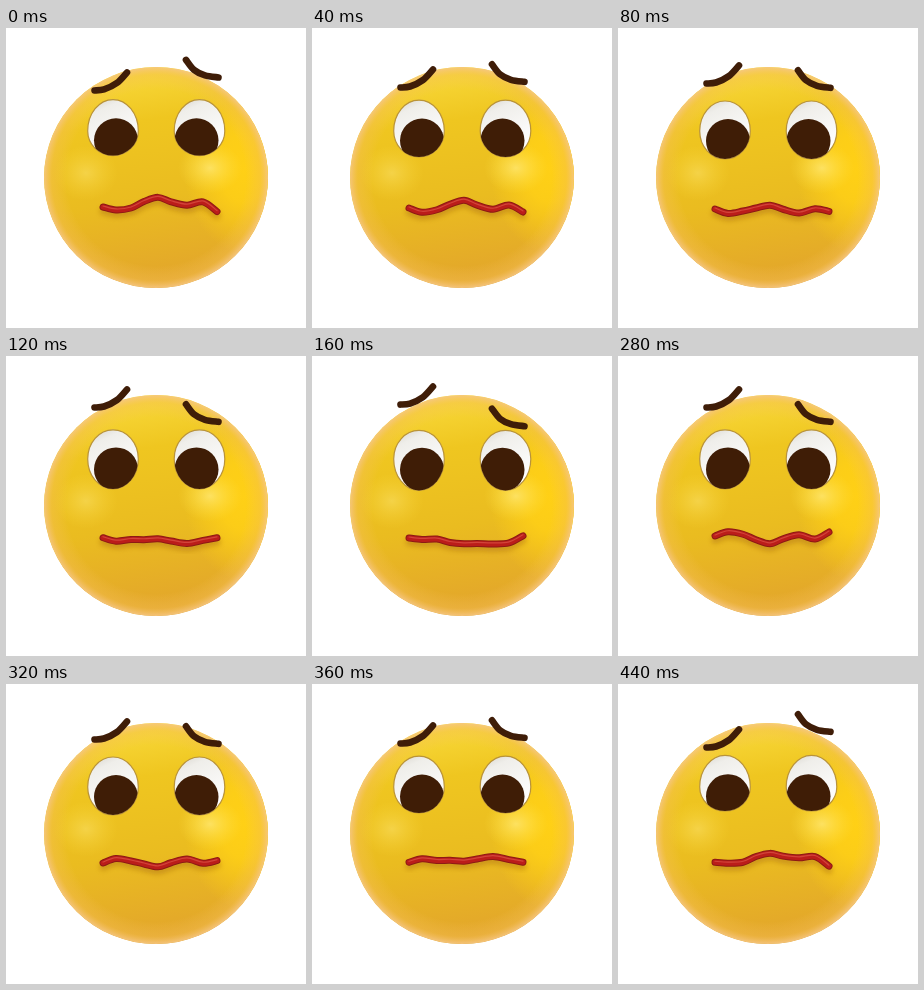
These frames come from a looping animation (300x300 px, 0.48 s). An HTML page:

```html
<!DOCTYPE html>
<html lang="en">
<head>
<meta charset="utf-8">
<title>Worried face</title>
<style>
  html, body { margin: 0; width: 100%; height: 100%; overflow: hidden; background: #fff; }
  svg { display: block; width: 100vw; height: 100vh; }
  path { fill: none; stroke-linecap: round; stroke-linejoin: round; }
</style>
</head>
<body>
<svg viewBox="0 0 300 300">
  <defs>
    <linearGradient id="skin" x1=".35" x2=".5" y2="1">
      <stop offset="0" stop-color="#f9da3c"/>
      <stop offset=".25" stop-color="#efc620"/>
      <stop offset=".6" stop-color="#eabc20"/>
      <stop offset="1" stop-color="#e2a42c"/>
    </linearGradient>
    <radialGradient id="rim">
      <stop offset=".8" stop-color="#f6c35c" stop-opacity="0"/>
      <stop offset=".93" stop-color="#f5bf55" stop-opacity=".4"/>
      <stop offset="1" stop-color="#f6c684" stop-opacity=".9"/>
    </radialGradient>
    <radialGradient id="sun">
      <stop offset="0" stop-color="#ffd016"/>
      <stop offset=".4" stop-color="#ffd016" stop-opacity=".85"/>
      <stop offset="1" stop-color="#ffd016" stop-opacity="0"/>
    </radialGradient>
    <radialGradient id="glow">
      <stop offset="0" stop-color="#ffe978" stop-opacity=".75"/>
      <stop offset="1" stop-color="#ffe040" stop-opacity="0"/>
    </radialGradient>
    <linearGradient id="white" x2=".4" y2="1">
      <stop offset="0" stop-color="#d5d2ca"/>
      <stop offset=".25" stop-color="#efeeea"/>
      <stop offset="1" stop-color="#fff"/>
    </linearGradient>
    <filter id="soft" x="-20%" y="-100%" width="140%" height="300%">
      <feGaussianBlur stdDeviation="2.5"/>
    </filter>
    <clipPath id="ball"><ellipse cx="150" cy="149.5" rx="112" ry="110.5"/></clipPath>
    <clipPath id="clipL"><path class="lidL"/></clipPath>
    <clipPath id="clipR"><path class="lidR"/></clipPath>
  </defs>

  <g clip-path="url(#ball)">
    <rect x="38" y="39" width="224" height="221" fill="url(#skin)"/>
    <ellipse cx="238" cy="140" rx="60" ry="85" fill="url(#sun)"/>
    <ellipse cx="204" cy="140" rx="32" ry="26" fill="url(#glow)"/>
    <ellipse cx="80" cy="145" rx="32" ry="28" fill="url(#glow)" opacity=".6"/>
    <ellipse cx="150" cy="149.5" rx="112" ry="110.5" fill="url(#rim)"/>
  </g>

  <g stroke="#b9933a" stroke-width="1.2">
    <path class="lidL" style="fill:url(#white)"/>
    <path class="lidR" style="fill:url(#white)"/>
  </g>
  <g fill="#3f1d06">
    <g clip-path="url(#clipL)"><ellipse class="pupil" cx="110" rx="22" ry="22"/></g>
    <g clip-path="url(#clipR)"><ellipse class="pupil" cx="190.5" rx="22" ry="22"/></g>
  </g>

  <g stroke="#3f1d08" stroke-width="6.6">
    <path id="browL"/>
    <path id="browR"/>
  </g>

  <path class="lip" stroke="#a86a10" stroke-width="7" opacity=".45" transform="translate(0 4)" filter="url(#soft)"/>
  <path class="lip" stroke="#8c1a14" stroke-width="7"/>
  <path class="lip" stroke="#bb1d1a" stroke-width="5"/>
  <path class="lip" stroke="#d2443a" stroke-width="1.2" transform="translate(0 -1)"/>
</svg>
<script>
const STEP = 40, STEPS = 12;

// Lip points: x, swing, and the step at which each one hangs lowest
const LIP = [
  [97, 2, 4], [110, 5.5, 2.3], [125, 3.5, 3], [138, 7.5, 5], [152, 11, 5.5],
  [165, 8, 4.7], [181, 8, 3.7], [197, 7.5, 4.8], [211, 4, 0.9]
];

const wave = (step, lag) => Math.cos((step - lag) / STEPS * 2 * Math.PI);
const set = (sel, name, value) =>
  document.querySelectorAll(sel).forEach(el => el.setAttribute(name, value));

// Smooth curve through the points
function curve(pts) {
  const at = i => pts[Math.max(0, Math.min(pts.length - 1, i))];
  let d = `M${pts[0]}`;
  for (let i = 0; i < pts.length - 1; i++) {
    const [p, a, b, n] = [at(i - 1), at(i), at(i + 1), at(i + 2)];
    const c1 = a.map((v, k) => v + (b[k] - p[k]) / 6);
    const c2 = b.map((v, k) => v - (n[k] - a[k]) / 6);
    d += `C${c1} ${c2} ${b}`;
  }
  return d;
}

// Eye opening made of an upper and a lower half ellipse
function eye(cx, top, bottom) {
  const rx = 25.3, mid = 103;
  return `M${cx - rx} ${mid}A${rx} ${mid - top} 0 0 1 ${cx + rx} ${mid}` +
    `A${rx} ${bottom - mid} 0 0 1 ${cx - rx} ${mid}Z`;
}

function draw(step) {
  const low = wave(step, -1);
  const yL = 47 + 8 * low, yR = 52.3 - 12 * low;
  const top = 73 - 1.7 * low, bottom = 131 - 4 * low;

  set('#browL', 'd', curve([[88.5, yL + 8.5], [98, yL + 7.5], [111, yL + 1], [121, yL - 9.5]]));
  set('#browR', 'd', curve([[180, yR - 10], [188, yR], [199, yR + 5.5], [212.5, yR + 7.5]]));
  set('.lidL', 'd', eye(107, top, bottom));
  set('.lidR', 'd', eye(193.5, top, bottom));
  set('.pupil', 'cy', 113 - 0.8 * low);
  set('.lip', 'd', curve(LIP.map(([x, swing, lag]) => [x, 180 + swing * wave(step, lag)])));
}

function tick(now) {
  draw(Math.floor(now / STEP) % STEPS);
  requestAnimationFrame(tick);
}

draw(0);
requestAnimationFrame(tick);
</script>
</body>
</html>
```
